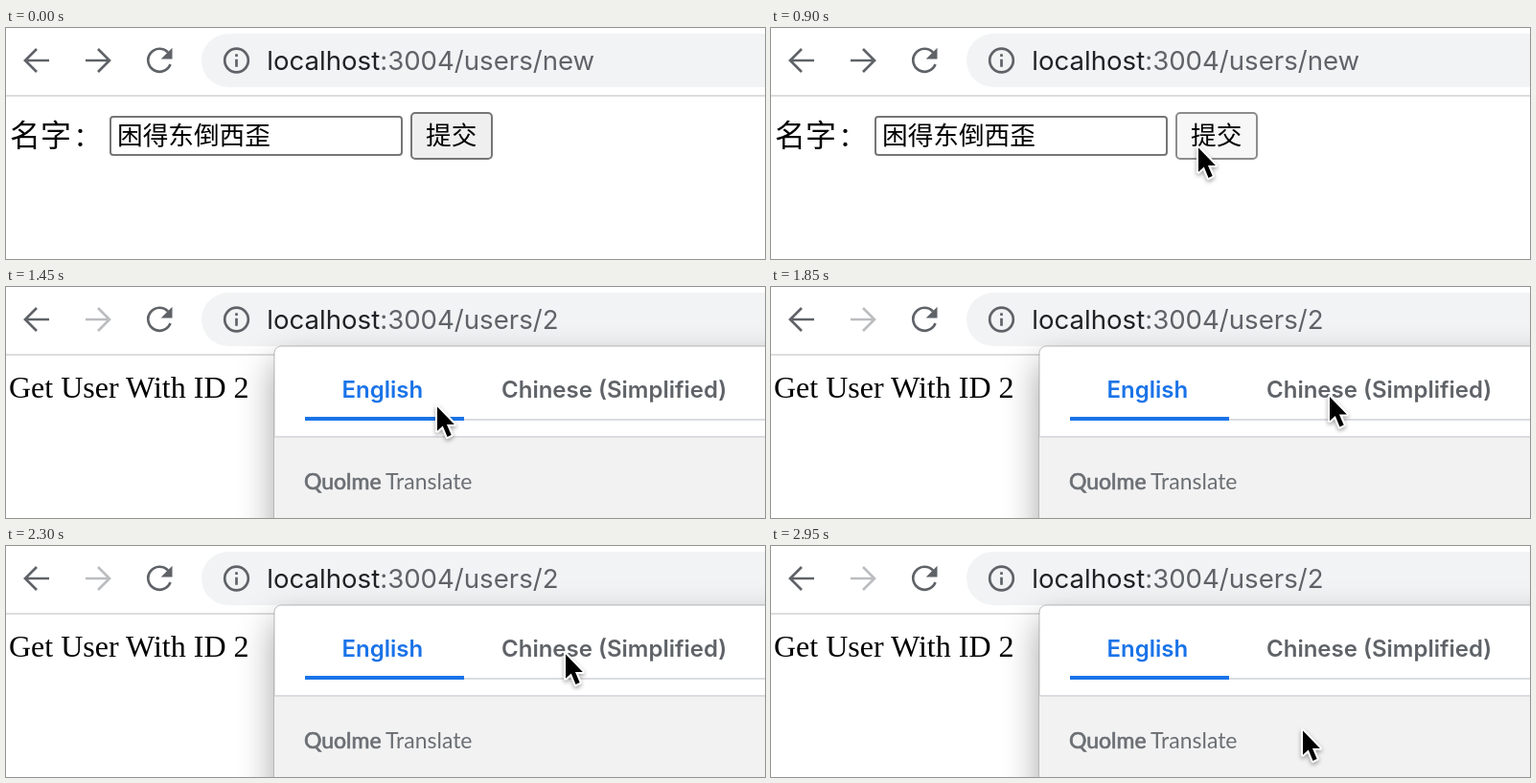
Animation of 792x242 px, one loop 3.05 s. Source, as an HTML page:

```html
<!DOCTYPE html>
<html lang="zh-CN">
<head>
<meta charset="utf-8">
<title>User form</title>
<style>
  html, body { margin: 0; width: 100%; height: 100%; overflow: hidden; background: #fff; }
  svg { display: block; width: 792px; height: 242px; }
  text { white-space: pre; }
  .ui { font-family: Inter, Roboto, sans-serif; }
  .cjk { font-family: "Noto Sans CJK SC", "Noto Sans CJK", sans-serif; font-size: 26.67px; }
  .label { font-size: 32px; font-weight: 300; }
  .serif { font-family: "Liberation Serif", serif; font-size: 32px; }
  .url { font-size: 27.6px; fill: #5f6368; }
  .tab { font-size: 24px; font-weight: 600; fill: #5f6368; }
  .brand { font-family: Lato, sans-serif; font-size: 23px; fill: #6b6f74; }
  .icon { fill: none; stroke: #5f6368; stroke-width: 2.7; }
  .shadow { filter: drop-shadow(0 16px 18px rgba(0, 0, 0, .36)); }
  .pointer { filter: drop-shadow(0 2px 2px rgba(0, 0, 0, .35)); }
</style>
</head>
<body>
<svg viewBox="0 0 792 242">
  <defs>
    <path id="arrow" d="M13 0H-12M0-12L-12 0 0 12"/>
    <path id="ibeam" fill="none" d="M-7-15C-3-15 0-14 0-11V11C0 14-3 15-7 15M7-15C3-15 0-14 0-11M0 11C0 14 3 15 7 15M-4 1H4"/>
  </defs>

  <!-- toolbar -->
  <rect x="204" y="6" width="640" height="56" rx="28" fill="#f1f3f4"/>
  <rect y="70" width="792" height="2" fill="#dcdddf"/>
  <g class="icon">
    <use href="#arrow" transform="translate(32 34)"/>
    <use id="forward" href="#arrow" transform="translate(96 34) scale(-1 1)"/>
    <path d="M169 25.5A12 12 0 1 0 171.5 38"/>
    <path d="M173.5 20.7V32.5H161.7z" fill="#5f6368" stroke="none"/>
    <circle cx="240.5" cy="34" r="12.3"/>
    <path d="M240.5 32.7v8M240.5 27.3v2.7"/>
  </g>
  <text class="ui url" x="272.3" y="44"><tspan fill="#202124">localhost</tspan>:3004/users/<tspan id="route">new</tspan></text>

  <g id="form">
    <text class="cjk label" x="4" y="124">名字<tspan dx="2.5" font-size="28">：</tspan></text>
    <rect id="field" x="109" y="93" width="304" height="40" rx="3" fill="#fff" stroke-width="2"/>
    <text class="cjk" x="116" y="122.3">困得东倒西歪</text>
    <rect id="button" x="423" y="89" width="84" height="48" rx="4" stroke-width="2"/>
    <text class="cjk" x="438" y="122.3">提交</text>
  </g>

  <g id="result">
    <text class="serif" x="3" y="116">Get User With ID 2</text>
    <g id="popup">
      <rect class="shadow" x="280" y="62" width="640" height="400" rx="7" fill="#fff" stroke="#000" stroke-opacity=".25"/>
      <path d="M280 157H792V242H280z" fill="#f2f2f2"/>
      <path d="M280 157H792M312 139H792" stroke="#dadce0" stroke-width="2"/>
      <path d="M312 138H478" stroke="#1a73e8" stroke-width="4"/>
      <text class="ui tab" x="350.5" y="116" style="fill:#1a73e8">English</text>
      <text class="ui tab" x="517" y="116">Chinese (Simplified)</text>
      <text class="brand" x="311" y="212"><tspan stroke="#6b6f74" stroke-width=".7">Quolme</tspan></text>
      <text class="brand" x="396" y="212">Translate</text>
    </g>
  </g>

  <g id="cursor">
    <path id="pointer" class="pointer" transform="translate(0 .5) scale(1.05)" d="M0 0V24L5.5 19 10 30 14 28 9.5 17.5H17z" stroke="#fff" stroke-width="4" paint-order="stroke" stroke-linejoin="round"/>
    <g id="caret">
      <use href="#ibeam" stroke="#fff" stroke-width="5"/>
      <use href="#ibeam" stroke="#000" stroke-width="2.2"/>
    </g>
  </g>
</svg>
<script>
  const LOOP = 3050, STEP = 50;
  const ENTER = 250, LOAD = 1050, FADE = 200;

  const moves = [
    { from: 225, to: 500, x: 345, y: 116 },
    { from: 500, to: 850, x: 446, y: 125 },
    { from: 1400, to: 1450, x: 450, y: 125 },
    { from: 1750, to: 1950, x: 716, y: 104 },
    { from: 2075, to: 2300, x: 584, y: 113 },
    { from: 2300, to: 2600, x: 555, y: 193 }
  ];

  const $ = id => document.getElementById(id);
  const show = (id, on) => $(id).setAttribute("display", on ? "inline" : "none");
  const set = (id, attrs) => {
    for (const key in attrs) $(id).setAttribute(key, attrs[key]);
  };
  const progress = (t, from, to) => Math.min(1, Math.max(0, (t - from) / (to - from)));
  const ease = k => k * k * (3 - 2 * k);

  function cursorAt(t) {
    let x = 260, y = 240;
    for (const move of moves) {
      const k = ease(progress(t, move.from, move.to));
      x += (move.x - x) * k;
      y += (move.y - y) * k;
    }
    return [x, y];
  }

  function draw(time) {
    const t = Math.floor(time % LOOP / STEP) * STEP;
    const loaded = t >= LOAD;
    const typing = t >= 450 && t < 700;
    const hover = t >= 750, pressed = t >= 900;

    show("form", !loaded);
    show("result", loaded);
    $("route").textContent = loaded ? "2" : "new";
    $("forward").style.stroke = loaded ? "#bbbdc0" : "#5f6368";
    set("field", { stroke: typing ? "#4f4f4f" : "#767676" });
    set("button", {
      fill: pressed ? "#f7f7f7" : hover ? "#e5e5e5" : "#efefef",
      stroke: pressed ? "#8d8d8d" : hover ? "#4f4f4f" : "#767676"
    });
    set("popup", { opacity: progress(t, LOAD, LOAD + FADE) });

    show("cursor", t >= ENTER);
    show("caret", typing);
    show("pointer", !typing);
    set("cursor", { transform: `translate(${cursorAt(t).join(" ")})` });
  }

  const start = performance.now();
  function tick() {
    draw(performance.now() - start);
    requestAnimationFrame(tick);
  }
  tick();
</script>
</body>
</html>
```
